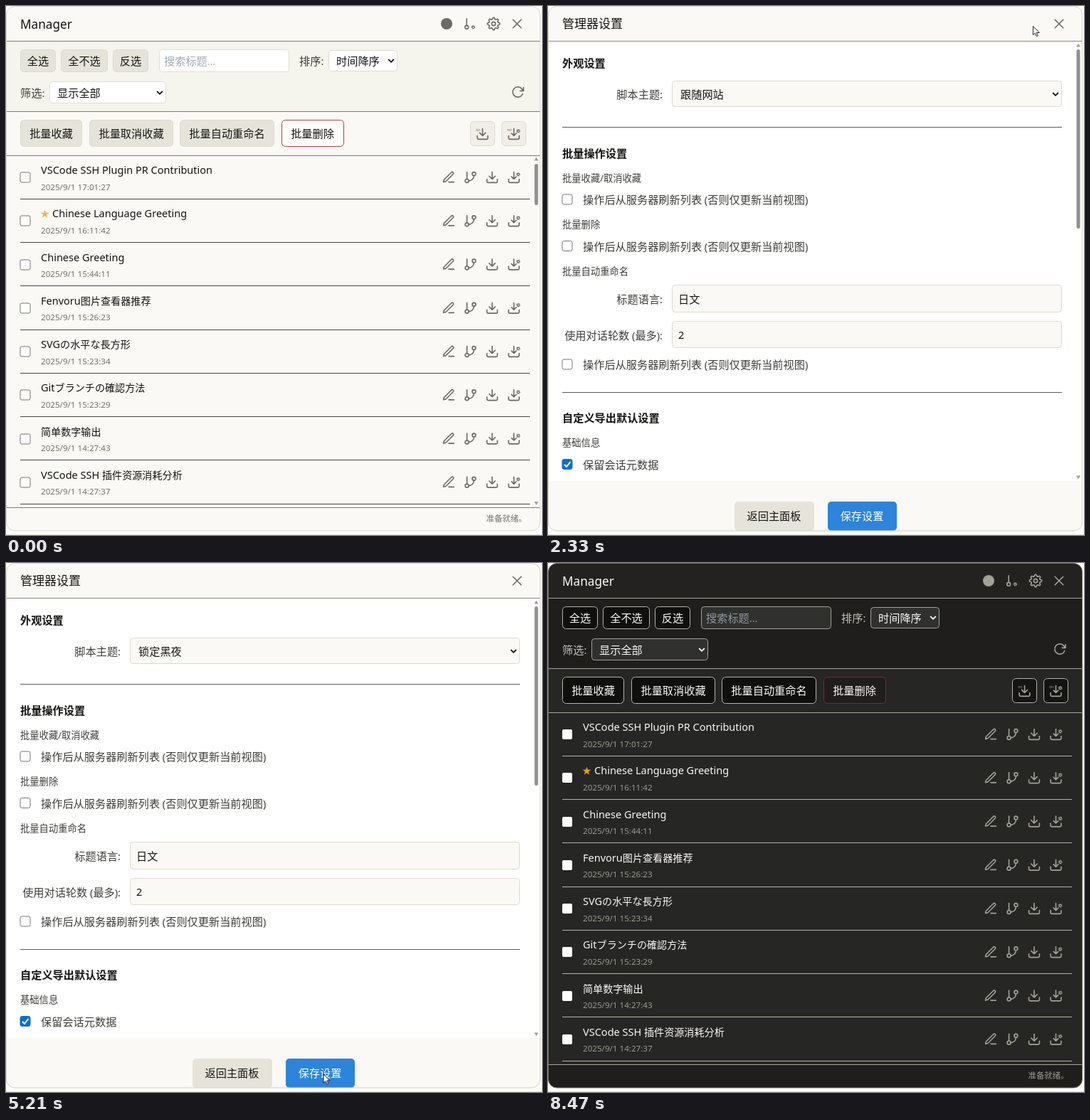
These frames come from a looping animation (753x744 px, 8.73 s). An HTML page:

```html
<!DOCTYPE html>
<html lang="zh-CN">
<head>
<meta charset="utf-8">
<title>Manager</title>
<style>
html, body { margin: 0; width: 100%; height: 100%; overflow: hidden; background: #fdfdfb; }
svg { display: block; width: 753px; height: 744px; font-family: "Noto Sans", "Noto Sans CJK SC", "Noto Sans CJK", sans-serif; }
.latin { font-size: .955em; }
.title .latin { font-size: 1.03em; }
.icon { fill: none; stroke: var(--icon); stroke-width: 2; stroke-linecap: round; stroke-linejoin: round; }
.dark text[fill="var(--text)"] { font-weight: 500; }

.light {
  --panel: #faf9f5; --bar: #f5f4ed; --head: #faf9f5; --border: #d9d7cd;
  --line: #474745; --edge: #7d7c77; --text: #141413; --label: #3d3d3a; --muted: #73726c; --icon: #6b6a65;
  --btn: #e6e4da; --btnEdge: #dcdacf; --tool: #f0eee6; --field: #fff; --fieldEdge: #dfddd3; --hint: #a3abb3;
  --del: #fdfcfa; --delEdge: #a5483c; --box: #767676; --star: #f0b352;
}
.dark {
  --panel: #262624; --bar: #1f1e1d; --head: #232221; --border: #6b6a65;
  --line: #b5b3ab; --edge: #a5a39b; --text: #faf9f5; --label: #c2c0b6; --muted: #9c9a92; --icon: #a3a198;
  --btn: #0f0f0e; --btnEdge: #b5b3ab; --tool: #141413; --field: #30302e; --fieldEdge: #a3a198; --hint: #9097a0;
  --del: #1f1e1d; --delEdge: #762b2b; --box: none; --star: #d9a02c;
}

.settings, .dark, .hover, .menu, .opt0, .opt1, .opt2, .old, .new, .press, .saved, .dark .ready {
  animation: 8.73s step-end infinite;
}
.settings { animation-name: settings; }
.dark { animation-name: dark; }
.hover { animation-name: hover; }
.menu { animation-name: menu; }
.opt0 { animation-name: opt0; }
.opt1 { animation-name: opt1; }
.opt2 { animation-name: opt2; }
.old { animation-name: old; }
.new { animation-name: new; }
.press { animation-name: press; }
.saved { animation-name: saved; }
.dark .ready { animation-name: ready; }
.light .saved { display: none; }
.cursor { animation: move 8.73s linear infinite; }
.arrow { animation: arrow 8.73s step-end infinite; }

@keyframes settings { 0%, 60.36% { opacity: 0 } 24.4% { opacity: 1 } }
@keyframes dark { 0% { opacity: 0 } 60.36%, 100% { opacity: 1 } }
@keyframes menu { 0%, 49.02% { opacity: 0 } 36.66% { opacity: 1 } }
@keyframes opt0 { 0% { opacity: 1 } 43.9%, 100% { opacity: 0 } }
@keyframes opt1 { 0%, 44.8% { opacity: 0 } 43.9% { opacity: 1 } }
@keyframes opt2 { 0% { opacity: 0 } 44.8%, 100% { opacity: 1 } }
@keyframes old { 0% { opacity: 1 } 49.02%, 100% { opacity: 0 } }
@keyframes new { 0% { opacity: 0 } 49.02%, 100% { opacity: 1 } }
@keyframes press { 0%, 39.74%, 49.02% { opacity: 0 } 36.66%, 47.42% { opacity: 1 } }
@keyframes arrow { 0%, 74.91% { opacity: 0 } 9.04% { opacity: 1 } }
@keyframes saved { 0% { opacity: 1 } 93.92% { opacity: .65 } 94.67% { opacity: .3 } 95.41%, 100% { opacity: 0 } }
@keyframes ready { 0% { opacity: 0 } 95.41% { opacity: .5 } 97.02%, 100% { opacity: 1 } }
@keyframes hover {
  0%, 13.13%, 100% { opacity: 0; transform: none }
  9.46% { opacity: 1; transform: translateY(183.75px) }
  10.18% { opacity: 1; transform: translateY(122.5px) }
  11.02% { opacity: 1; transform: translateY(61.25px) }
  11.99% { opacity: 1; transform: none }
}
@keyframes move {
  0%, 9.04% { transform: translate(540px, 492px); animation-timing-function: ease-out }
  16.61% { transform: translate(584px, 99px) }
  18.9%, 19.7% { transform: translate(612px, 73px); animation-timing-function: ease-out }
  23.6%, 29.4% { transform: translate(681px, 28px); animation-timing-function: ease-in-out }
  36.66%, 41.5% { transform: translate(284.5px, 117.5px); animation-timing-function: ease-out }
  45.12%, 48.6% { transform: translate(266.5px, 200.5px); animation-timing-function: ease-in-out }
  55.1%, 100% { transform: translate(445.5px, 718.5px) }
}
</style>
</head>
<body>
<script>
const SIZE = 15.2, PITCH = 61.25;

const rich = s => s.replace(/[\x20-\x7e]+/g, run => `<tspan class="latin">${run}</tspan>`);

// Text is placed by the middle of its line.
function text(x, cy, s, { size = SIZE, fill = 'var(--text)', anchor = 'start', more = '' } = {}) {
  return `<text x="${x}" y="${(cy + size * .37).toFixed(2)}" font-size="${size}" fill="${fill}" text-anchor="${anchor}" ${more}>${rich(s)}</text>`;
}
const fillRect = (x, y, w, h, fill, more = '') =>
  `<rect x="${x}" y="${y}" width="${w}" height="${h}" fill="${fill}" ${more}/>`;
const box = (x1, y1, x2, y2, fill, edge, r = 5) =>
  fillRect(x1 + .5, y1 + .5, x2 - x1 - 1, y2 - y1 - 1, fill, `rx="${r}" stroke="${edge}"`);
const rule = (y, x1, x2, color) => fillRect(x1, y, x2 - x1, 1, color);
const button = (x1, y1, x2, y2, label) =>
  box(x1, y1, x2, y2, 'var(--btn)', 'var(--btnEdge)') + text((x1 + x2) / 2, (y1 + y2) / 2, label, { anchor: 'middle' });
const chevron = (x, y, color) =>
  `<path d="M${x - 3.8} ${y - 2}l3.8 3.8 3.8-3.8" fill="none" stroke="${color}" stroke-width="1.8"/>`;
const icon = (x, y, scale, body) =>
  `<g class="icon" transform="translate(${x} ${y}) scale(${scale}) translate(-12 -12)">${body}</g>`;

const polar = (n, radius, turn = 0) => Array.from({ length: n }, (_, i) => {
  const a = (i + turn) / n * 2 * Math.PI, r = radius(i);
  return `${(r * Math.sin(a)).toFixed(2)},${(-r * Math.cos(a)).toFixed(2)}`;
}).join(' ');

const miniGear = (x, y) =>
  `<circle cx="${x}" cy="${y}" r="1.8" stroke-width="1.4"/><circle cx="${x}" cy="${y}" r="2.9" stroke-width="1.3" stroke-linecap="butt" stroke-dasharray="1.139"/>`;
const tray = '<path d="M21 15v4a2 2 0 0 1-2 2H5a2 2 0 0 1-2-2v-4"/>';
const shapes = {
  pen: '<path d="M12 20h9M16.5 3.5a2.1 2.1 0 0 1 3 3L7 19l-4 1 1-4z"/>',
  branch: '<path d="M6 3v12M18 9a9 9 0 0 1-9 9"/><circle cx="18" cy="6" r="3"/><circle cx="6" cy="18" r="3"/>',
  download: tray + '<path d="M7 10l5 5 5-5M12 15V3"/>',
  downloadGear: tray + '<path d="M8 11l4 4 4-4M12 15V3"/>' + miniGear(19.5, 7),
  branchGear: '<path d="M6 3v12"/><circle cx="6" cy="18" r="3"/>' + miniGear(17.5, 18),
  gear: `<g transform="translate(12 12)"><polygon points="${polar(32, i => i % 4 < 2 ? 10.6 : 8, -.5)}"/><circle r="3.2"/></g>`,
  close: '<path d="M5 5l14 14M19 5L5 19"/>',
  refresh: '<path d="M22 4v6h-6M20.500 15a9 9 0 1 1-2.100-9.400L22 10"/>'
};

const chats = [
  ['VSCode SSH Plugin PR Contribution', '17:01:27'],
  ['Chinese Language Greeting', '16:11:42', true],
  ['Chinese Greeting', '15:44:11'],
  ['Fenvoru图片查看器推荐', '15:26:23'],
  ['SVGの水平な長方形', '15:23:34'],
  ['Gitブランチの確認方法', '15:23:29'],
  ['简单数字输出', '14:27:43'],
  ['VSCode SSH 插件资源消耗分析', '14:27:37']
];

function chatRow([title, time, starred], i) {
  const y = 241 + i * PITCH;
  const star = starred ? `<polygon transform="translate(54.500 ${y - 9.5})" points="${polar(10, k => k % 2 ? 2.5 : 6.3)}" fill="var(--star)"/>` : '';
  return fillRect(20, Math.round(y - 7), 14, 14, '#fff', 'rx="2" stroke="var(--box)"') + star
    + text(starred ? 65 : 49, y - 10, title, { size: 14.1, more: 'class="title"' })
    + text(49, y + 13, '2025/9/1 ' + time, { size: 12.16, fill: 'var(--muted)' })
    + ['pen', 'branch', 'download', 'downloadGear'].map((name, k) => icon(622 + k * 30.5, y, .82, shapes[name])).join('')
    + rule(Math.round(y + 29.9), 20, 736, 'var(--line)');
}

const scrollbar = (top, bottom, y1, y2) =>
  fillRect(742.5, y1, 5, y2 - y1, '#909090', 'rx="2.5"')
  + `<path d="M742 ${top + 2.5}h6l-3-5zM742 ${bottom - 2.5}h6l-3 5z" fill="#a0a09d"/>`;

const panel = (body, edge) =>
  `<g clip-path="url(#panel)">${body}</g><rect x=".5" y=".5" width="750" height="737.5" rx="12" fill="none" stroke="${edge}"/>`;

function manager(theme) {
  const label = { fill: 'var(--label)' };
  const small = { size: 11.4 };
  const exportButton = (x, name) => box(x, 162, x + 35, 197, 'var(--tool)', 'var(--btnEdge)')
    + icon(x + 17.5, 180, .82, shapes[name])
    + text(x + 8, 174.5, 'TXT', { size: 3.8, fill: 'var(--icon)', more: 'font-weight="700" opacity=".8"' });
  const body = fillRect(0, 0, 753, 744, 'var(--panel)')
    + fillRect(0, 0, 753, 49, 'var(--head)')
    + fillRect(0, 50, 753, 98, 'var(--bar)')
    + (theme === 'dark' ? fillRect(0, 705, 753, 40, 'var(--bar)') : '')
    + text(20, 25, 'Manager', { size: 18 })
    + '<circle cx="619" cy="25" r="8" fill="var(--icon)"/>'
    + icon(652, 25, .8, shapes.branchGear) + icon(685, 25, .82, shapes.gear) + icon(718, 25, .82, shapes.close)
    + rule(49, 0, 753, 'var(--edge)')
    + button(20, 61, 70, 93, '全选') + button(77, 61, 143, 93, '全不选') + button(150, 61, 200, 93, '反选')
    + box(215, 61, 398, 93, 'var(--field)', 'var(--fieldEdge)', 4) + text(222, 77, '搜索标题...', { fill: 'var(--hint)' })
    + text(412, 77, '排序:', label)
    + box(453, 62, 550, 92, 'var(--field)', 'var(--fieldEdge)', 4) + text(464, 77, '时间降序') + chevron(541, 77, 'var(--text)')
    + text(20, 122, '筛选:', label)
    + box(61, 106, 225, 137, 'var(--field)', 'var(--fieldEdge)', 4) + text(72, 122, '显示全部') + chevron(216, 122, 'var(--text)')
    + icon(719, 121, .8, shapes.refresh)
    + rule(148, 0, 753, 'var(--edge)')
    + button(20, 160, 107, 198, '批量收藏') + button(117, 160, 235, 198, '批量取消收藏') + button(244, 160, 377, 198, '批量自动重命名')
    + box(387, 160, 475, 198, 'var(--del)', 'var(--delEdge)') + text(430.5, 179, '批量删除', { anchor: 'middle' })
    + exportButton(652, 'download') + exportButton(696, 'downloadGear')
    + rule(210, 0, 753, 'var(--edge)')
    + (theme === 'light' ? fillRect(20, 211, 716, 60, '#f5f4ed', 'class="hover"') + scrollbar(215, 699.5, 222, 280) : '')
    + chats.map(chatRow).join('')
    + rule(705, 0, 753, 'var(--edge)')
    + text(674.5, 721, '准备就绪。', { ...small, fill: 'var(--muted)', more: 'class="ready"' })
    + text(663.5, 721, '设置已保存！', { ...small, fill: '#2fb980', more: 'class="saved"' });
  return `<g class="${theme}">${panel(body, 'var(--border)')}</g>`;
}

function settings() {
  const ink = '#141413', soft = '#3d3d3a';
  const plain = (x, y, s, more) => text(x, y, s, { fill: ink, more });
  const heading = (y, s) => plain(20, y, s, 'font-weight="700"');
  const sub = (y, s) => text(20, y, s, { size: 13.3, fill: soft });
  const label = (y, s) => text(161, y, s, { fill: soft, anchor: 'end' });
  const field = (y1, y2) => box(174, y1, 722, y2, '#faf9f5', '#dcdad0', 4);
  const check = (y, s, on) => fillRect(20, y - 7, 14, 14, on ? '#0a6fd0' : '#fff', `rx="2.5" stroke="${on ? '#0a6fd0' : '#767676'}"`)
    + (on ? `<path d="M23 ${y + .5}l3 3 5.500-7" fill="none" stroke="#fff" stroke-width="2"/>` : '')
    + text(49, y + .5, s, { fill: soft });
  const refresh = '操作后从服务器刷新列表 (否则仅更新当前视图)';
  const options = ['跟随网站', '锁定白天', '锁定黑夜'].map((s, i) => {
    const y = 158 + i * 27;
    return plain(187, y, s) + `<g class="opt${i}">${fillRect(176, y - 14 + (i ? .5 : 0), 545, 27, '#1967d2')}${text(187, y, s, { fill: '#fff' })}</g>`;
  }).join('');

  const body = fillRect(0, 0, 753, 744, '#faf9f5') + fillRect(0, 50, 753, 618, '#fff')
    + text(20, 25, '管理器设置', { size: 17, fill: ink })
    + icon(718, 25, .82, shapes.close) + rule(49, 0, 753, '#8a8984')
    + heading(80, '外观设置') + label(124, '脚本主题:') + field(105, 142)
    + plain(186, 124, '跟随网站', 'class="old"') + plain(186, 124, '锁定黑夜', 'class="new"') + chevron(713, 124, ink)
    + rule(170, 20, 722, '#5a5a57')
    + heading(207, '批量操作设置')
    + sub(242, '批量收藏/取消收藏') + check(272, refresh)
    + sub(307, '批量删除') + check(337.5, refresh)
    + sub(373, '批量自动重命名')
    + label(412, '标题语言:') + field(392, 431) + plain(183, 412, '日文')
    + label(463, '使用对话轮数 (最多):') + field(443, 481) + plain(183, 462, '2')
    + check(504, refresh)
    + rule(543, 20, 722, '#5a5a57')
    + heading(579, '自定义导出默认设置') + sub(614, '基础信息') + check(644.5, '保留会话元数据', true)
    + scrollbar(55, 663, 61, 313)
    + fillRect(262, 697, 112, 41, '#e6e4da', 'rx="5"') + text(317.5, 717.5, '返回主面板', { fill: ink, anchor: 'middle' })
    + fillRect(393, 697, 97, 41, '#2c84db', 'rx="5"') + text(441, 717.5, '保存设置', { fill: '#fff', anchor: 'middle' })
    + `<g class="menu">${box(175, 142, 722, 226, '#faf9f5', '#767676', 0)}${options}</g>`;
  return `<g class="settings" style="--icon:#6b6a65">${panel(body, '#d9d7cd')}</g>`;
}

const pointer = `<g class="cursor"><circle class="press" r="11.5" fill="#ff0" fill-opacity=".47"/>
  <path class="arrow" d="M.5.5v12.200l2.800-2.500 2.100 4.300 1.900-.9-2-4.100h4z" fill="#fff" stroke="#111" stroke-width=".9"/></g>`;

document.body.innerHTML = `<svg viewBox="0 0 753 744">
  <clipPath id="panel"><rect x=".5" y=".5" width="750" height="737.5" rx="12"/></clipPath>
  ${fillRect(0, 0, 753, 744, '#fdfdfb')}${rule(743, 0, 753, '#e8e6de')}
  ${manager('light')}${settings()}${manager('dark')}${pointer}</svg>`;
</script>
</body>
</html>
```
